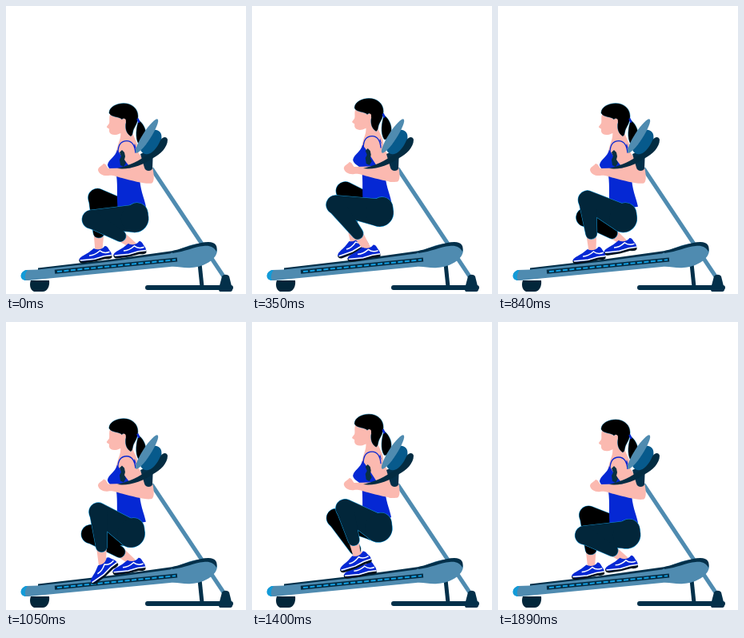
These frames come from a looping animation (300x360 px, 1.96 s). An HTML page with a canvas:

```html
<!DOCTYPE html>
<html lang="en">
<head>
<meta charset="utf-8">
<title>Treadmill</title>
<style>
html, body { margin: 0; width: 100%; height: 100%; overflow: hidden; background: #fff; }
canvas { display: block; width: 300px; height: 360px; }
</style>
</head>
<body>
<canvas id="stage" width="300" height="360"></canvas>
<script>
const ctx = document.getElementById('stage').getContext('2d');
const LOOP = 1960, STEP = 70;
const NAVY = '#02263a', DARK = '#03304a', BLACK = '#000', BLUE = '#0528d4',
      SKIN = '#fbb9b0', STEEL = '#4f8bb0', DEEP = '#075a8c', EDGE = '#1592cf';

// The body rises and sinks once per step, twice per loop
const bounce = p => 1 - Math.cos(2 * p + .44);

// Foot circles: sliding forward on the belt, then lifted and carried back
function pose(p) {
  const c = Math.cos(p), s = Math.sin(p), b = bounce(p);
  const swing = Math.max(0, p % (2 * Math.PI) / Math.PI - 1);
  const peel = Math.min(1, swing * 14) * (1 - swing) ** 2;
  return {
    kx: 110.5 - 3.8 * c - 5 * s,
    ky: 254 + 13.5 * c + 3 * s - 7.5 * b,
    ax: 138.5 + 21.5 * c - 1.5 * b + 5 * peel,
    ay: 300 - 3 * c + (s > 0 ? 3 : 10) * s,
    tilt: -8 - 34 * peel
  };
}

function fill(d, color) {
  ctx.fillStyle = color;
  ctx.fill(new Path2D(d));
}

function line(d, color, width, cap = 'butt') {
  ctx.strokeStyle = color;
  ctx.lineWidth = width;
  ctx.lineCap = cap;
  ctx.stroke(new Path2D(d));
}

function ellipse(x, y, rx, ry, turn, color) {
  ctx.fillStyle = color;
  ctx.beginPath();
  ctx.ellipse(x, y, rx, ry, turn, 0, Math.PI * 2);
  ctx.fill();
}

function shifted(y, draw) {
  ctx.save();
  ctx.translate(y * .13, y);
  draw();
  ctx.restore();
}

// Tapered limb with round ends
function limb(x1, y1, r1, x2, y2, r2) {
  const dir = Math.atan2(y2 - y1, x2 - x1);
  const open = Math.acos((r1 - r2) / Math.hypot(x2 - x1, y2 - y1));
  const p = new Path2D();
  p.arc(x1, y1, r1, dir + open, dir - open + Math.PI * 2);
  p.arc(x2, y2, r2, dir - open, dir + open);
  p.closePath();
  return p;
}

function shoe(x, y, tilt) {
  ctx.save();
  ctx.translate(x, y);
  ctx.rotate(tilt * Math.PI / 180);
  fill('M-27 10L14 10L14 13C13 15 9 15 5 14L-8 15.5L-23 15.5C-27 15-28 12-27 10Z', '#02131f');
  fill('M-27 11C-27 7-20 6-14 3L-7-1C-3 2 3 2 7-2C10-2 11 2 12 4C14 7 14 9 14 11L5 11L-8 13L-23 13Z', BLUE);
  line('M-26 11.5L-8 12.3L4 10.5L14 10.5', '#fff', 1.5);
  line('M-14 7C-8 8-3 5 0 3C3 6 8 7 12 6', '#fff', 1.5);
  ctx.restore();
}

function leg(hx, hy, { kx, ky, ax, ay, tilt }, color) {
  const cx = kx + (ax - kx) * .68, cy = ky + (ay - ky) * .68;
  ctx.fillStyle = SKIN;
  ctx.fill(limb(cx, cy, 6.5, ax - 1, ay + 2, 4.5));
  shoe(ax, ay, tilt);
  const parts = [
    limb(hx, hy, 17, kx, ky, 11.5),
    limb(kx, ky, 11, cx, cy, 7),
    limb(hx, hy, 17, hx + 3, hy - 6, 13.5)
  ];
  ctx.strokeStyle = EDGE;
  ctx.lineWidth = 1.1;
  parts.forEach(p => ctx.stroke(p));
  ctx.fillStyle = color;
  parts.forEach(p => ctx.fill(p));
}

function deck() {
  fill('M31 343L54 343C55 351 51 357 46 357L35 357C30 355 29 348 31 343Z', NAVY);
  line('M177 352L281 352', DARK, 6, 'round');
  line('M242 322L245 351', DARK, 5);
  line('M182 203L272 338', STEEL, 5);
  fill('M40 327.5L130 317L216 305L216 314L40 332Z', DARK);
  fill('M25 330L40 329.5L130 319.5L205 309.5C214 306 225 299 240 297C254 295 264 299 264 306C263 317 248 326 232 327C222 328 214 325 205 326L28 343C17 344 16 333 25 330Z', STEEL);
  fill('M208 306C226 302 240 295 253 295C262 295 265 300 263 307C260 301 254 299 247 300C235 301 224 307 208 309Z', DARK);
  fill('M25 330L27 330C24 334 23 339 25 343C17 343 16 333 25 330Z', '#139bd8');
  line('M61 332.3L214 317', '#032c44', 5);
  ctx.setLineDash([6, 2.5]);
  line('M64 332L212 317.2', '#129fe2', 2);
  ctx.setLineDash([]);
  fill('M270 338C272 335 277 335 279 338L283 354C283 357 281 357 279 357L268 357C266 357 266 355 266 353Z', DARK);
}

function torso() {
  fill('M143 152L158 155C158 164 164 168 165 177L163 198L136 196C137 185 139 177 141 171C143 166 144 162 143 152Z', SKIN);
  fill('M139 180C137 189 128 192 127 199C128 205 136 206 138 212C140 225 138 240 140 257L175 251C173 240 167 230 167 211C167 195 164 182 161 172L157 187L145 188Z', BLUE);
}

function head() {
  fill('M131 134C128 139 130 143 129 147L126 151C126 153 129 153 129 154L129 157C130 161 134 162 139 161L144 159L158 158L158 138L145 130Z', SKIN);
  const hair = 'M129 134C129 126 139 122 147 122C158 122 165 129 165 138C165 147 161 150 159 156C158 160 158 162 156 163C150 159 149 153 150 146C150 142 147 139 145 142C142 138 132 140 129 134Z';
  const tail = 'M166 143C173 148 177 159 174 166C172 172 169 174 166 173C161 165 163 152 166 143Z';
  [hair, tail].forEach(d => {
    line(d, EDGE, .8);
    fill(d, BLACK);
  });
  ellipse(147.5, 145, 2.3, 4, .15, SKIN);
  line('M164.5 141L166.5 146', BLUE, 2.5);
}

function arm(lift) {
  ctx.fillStyle = SKIN;
  ctx.fill(limb(151.5, 181 + lift, 10, 174, 211, 9));
  shifted(lift, () => line('M140 184C140 173 145 169 151 169C158 169 161 174 162 184', BLUE, 1.3));
  shifted(lift * .3, () => {
    fill('M115 205C115 201 120 200 122 197C125 197 126 201 128 203L166 202L182 198C185 208 186 218 183 221C179 224 160 219 145 215C137 213 133 211 128 212C122 213 116 210 115 205Z', SKIN);
    fill('M142 183L145 180L148 183L149 188L148 192L150 196L147 201L143 199L142 192L144 188Z', '#082f42');
  });
}

function frontConsole() {
  fill('M168 185L184 178L183 203C182 207 174 207 173 202Z', DARK);
  ellipse(181, 170, 11, 17, .65, DEEP);
  ellipse(176, 162.5, 5.2, 25, .57, STEEL);
  fill('M139 203C151 200 162 196 172 189C184 184 189 177 193 168C196 163 201 163 202 167C202 177 193 185 184 190C171 199 154 205 139 203Z', '#032c42');
}

function draw(t) {
  const p = t / LOOP * 2 * Math.PI, b = bounce(p);
  const hx = 158.5 + 2.3 * Math.cos(p), hy = 266 - 4 * b, lift = -3.4 * b;
  ctx.fillStyle = '#fff';
  ctx.fillRect(0, 0, 300, 360);
  deck();
  leg(hx - 5, hy - 2, pose(p + Math.PI), BLACK);
  shifted(lift, torso);
  leg(hx, hy, pose(p), NAVY);
  shifted(lift, head);
  arm(lift);
  frontConsole();
}

const start = performance.now();
function tick() {
  const t = (performance.now() - start) % LOOP;
  draw(Math.floor(t / STEP) * STEP);
  requestAnimationFrame(tick);
}
tick();
</script>
</body>
</html>
```
